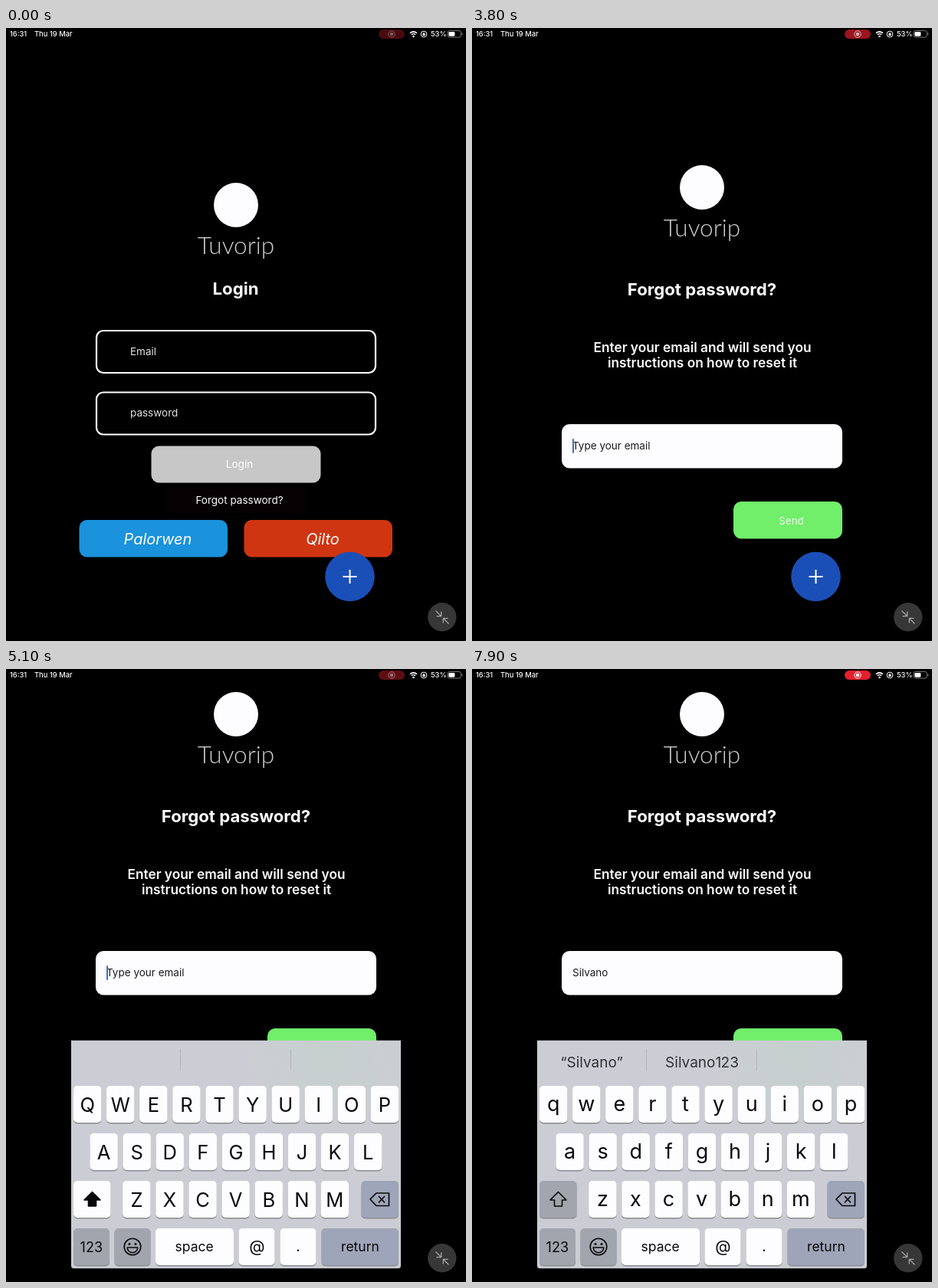
An HTML page with a canvas that plays this animation: 600 px wide and 800 px high, repeating every 8000 ms.

```html
<!DOCTYPE html>
<html lang="en">
<head>
<meta charset="utf-8">
<title>Password reset</title>
<style>
html, body { margin: 0; width: 100%; height: 100%; overflow: hidden; background: #000; }
canvas { display: block; width: 600px; height: 800px; }
</style>
</head>
<body>
<canvas id="stage"></canvas>
<script>
const LOOP = 8000, STEP = 100;
const WHITE = '#fdfcfe', INK = '#08080a';
const NAME = 'Silvano';
const TYPED_AT = [5300, 5600, 6000, 6400, 6500, 6900, 7200];
const FOCUS = 3800;

const canvas = document.getElementById('stage');
const ctx = canvas.getContext('2d');
const dpr = window.devicePixelRatio || 1;
canvas.width = 600 * dpr;
canvas.height = 800 * dpr;

const clamp = v => Math.max(0, Math.min(1, v));

// Critically damped spring from 0 to 1
function spring(ms) {
  const x = Math.max(0, ms) * 0.0163;
  return 1 - (1 + x) * Math.exp(-x);
}

function box(x, y, w, h, r, fill) {
  ctx.beginPath();
  ctx.roundRect(x, y, w, h, r);
  if (fill) {
    ctx.fillStyle = fill;
    ctx.fill();
  }
}

function disc(x, y, r, fill) {
  ctx.beginPath();
  ctx.arc(x, y, r, 0, 7);
  ctx.fillStyle = fill;
  ctx.fill();
}

function ring(x, y, r, color, width) {
  ctx.beginPath();
  ctx.arc(x, y, r, 0, 7);
  ctx.strokeStyle = color;
  ctx.lineWidth = width;
  ctx.stroke();
}

// Each path is a flat list of coordinates
function lines(paths, color, width) {
  ctx.beginPath();
  for (const p of paths) {
    ctx.moveTo(p[0], p[1]);
    for (let i = 2; i < p.length; i += 2) ctx.lineTo(p[i], p[i + 1]);
  }
  ctx.strokeStyle = color;
  ctx.lineWidth = width;
  ctx.stroke();
}

function label(str, x, y, font, color = WHITE, align = 'center') {
  ctx.font = font + ' Inter, "Liberation Sans", sans-serif';
  ctx.textAlign = align;
  ctx.fillStyle = color;
  ctx.fillText(str, x, y);
}

function statusBar(t) {
  label('16:31', 5, 11, '500 9.3px', WHITE, 'left');
  label('Thu 19 Mar', 37, 11, '500 9.4px', WHITE, 'left');
  label('53%', 554, 11, '500 9.3px', WHITE, 'left');

  ctx.save();
  ctx.globalAlpha = 0.32 + 0.68 * Math.min(1, 1 - Math.cos(t / 1750 * 2 * Math.PI));
  box(486, 2, 34, 12, 6, '#e4202f');
  ring(503, 8, 4.2, '#fff', 1);
  disc(503, 8, 2.3, '#fff');
  ctx.restore();

  ctx.strokeStyle = WHITE;
  ctx.lineWidth = 1.6;
  for (const r of [3.6, 6.4]) {
    ctx.beginPath();
    ctx.arc(531.5, 11.3, r, -Math.PI * 0.75, -Math.PI * 0.25);
    ctx.stroke();
  }
  disc(531.5, 11, 1.3, WHITE);

  ring(545, 8, 3.9, WHITE, 1);
  box(543.4, 7.3, 3.2, 2.6, 0.5, WHITE);
  ring(545, 7.2, 1, WHITE, 0.7);

  box(576, 3.5, 17.5, 8.6, 2.6);
  ctx.strokeStyle = '#77777a';
  ctx.lineWidth = 1;
  ctx.stroke();
  box(577.4, 4.9, 8, 5.8, 1.4, WHITE);
  box(594.4, 6.4, 1.2, 2.8, 0.6, '#77777a');
}

function brand(y) {
  disc(300, y, 29, WHITE);
  ctx.font = '300 31.5px Lato, sans-serif';
  ctx.textAlign = 'center';
  ctx.fillStyle = '#d0d0d2';
  ctx.fillText('Tuvorip', 300, y + 64);
}

function outlined(y, str) {
  box(118, y, 364, 55, 9);
  ctx.strokeStyle = '#fff';
  ctx.lineWidth = 2.2;
  ctx.stroke();
  label(str, 162, y + 31.5, '13.5px', '#e2e2e4', 'left');
}

function loginPage() {
  brand(231);
  label('Login', 299.5, 348, '700 22.2px');
  outlined(395, 'Email');
  outlined(475.5, 'password');
  box(189.5, 545.5, 221, 48, 10, '#c7c7c7');
  label('Login', 304.5, 574, '13.5px');
  box(210, 599, 180, 34, 8, '#060203');
  label('Forgot password?', 304.5, 620.5, '13.5px');
  box(95.5, 642, 193.5, 48.5, 10, '#1a92dc');
  label('Palorwen', 198, 673.5, 'italic 400 20px');
  box(310.5, 642, 193.5, 48.5, 10, '#d03511');
  label('Qilto', 413, 673.5, 'italic 400 20px');
}

function caretOn(t, typed) {
  if (t < FOCUS) return false;
  const since = typed ? TYPED_AT[typed - 1] : FOCUS;
  return (t - since) % 1000 < 600;
}

function resetPage(t, typed) {
  ctx.save();
  ctx.translate(0, -149 * spring(t - FOCUS - 23));
  brand(208);
  label('Forgot password?', 300, 349, '700 22.2px');
  label('Enter your email and will send you', 300.5, 422.5, '600 17.3px');
  label('instructions on how to reset it', 300.5, 443, '600 17.3px');
  box(117, 517, 366, 57.5, 10, WHITE);
  const str = NAME.slice(0, typed);
  label(str || 'Type your email', 131, 550, '13.5px', '#1a1a1c', 'left');
  if (caretOn(t, typed)) {
    const x = 131 + (typed ? ctx.measureText(str).width : 0);
    box(x, 536, 2, 19, 1, '#416fd0');
  }
  box(341, 618, 142, 48.5, 10, '#71ee6a');
  label('Send', 416.5, 647.5, '13.5px', '#eefcee');
  ctx.restore();
}

function addButton() {
  disc(448.5, 716, 32.3, '#1b4fb8');
  lines([[439.5, 716, 457.5, 716], [448.5, 707, 448.5, 725]], '#fff', 2);
}

function key(x, y, w, fill = WHITE) {
  box(x, y + 1.3, w, 48.2, 5, '#8b8d93');
  box(x, y, w, 48, 5, fill);
}

function shiftIcon(upper) {
  const pts = [112.5, 682.5, 123, 693, 117.5, 693, 117.5, 701, 107.5, 701, 107.5, 693, 102, 693];
  ctx.beginPath();
  for (let i = 0; i < pts.length; i += 2) ctx.lineTo(pts[i], pts[i + 1]);
  ctx.closePath();
  ctx.fillStyle = ctx.strokeStyle = INK;
  ctx.lineWidth = 1.6;
  if (upper) ctx.fill();
  ctx.stroke();
}

function deleteIcon() {
  ctx.beginPath();
  for (const [x, y] of [[475, 692], [483, 684], [499.5, 684], [499.5, 700.5], [483, 700.5]]) ctx.lineTo(x, y);
  ctx.closePath();
  ctx.strokeStyle = INK;
  ctx.lineWidth = 1.7;
  ctx.stroke();
  lines([[486, 688, 494, 696.4], [494, 688, 486, 696.4]], INK, 1.6);
}

function smiley() {
  ring(165, 754, 10.8, INK, 1.6);
  disc(161, 750.5, 1.5, INK);
  disc(169, 750.5, 1.5, INK);
  ctx.beginPath();
  ctx.arc(165, 755, 6.8, 0, Math.PI);
  ctx.closePath();
  ctx.lineWidth = 1.5;
  ctx.stroke();
}

// Letters appear one after another from the left
function fadeIn(str, cx, y, age) {
  ctx.font = '19px Inter, "Liberation Sans", sans-serif';
  const left = cx - ctx.measureText(str).width / 2;
  [...str].forEach((ch, i) => {
    ctx.globalAlpha = clamp((age - 30 * i) / 300);
    label(ch, left + ctx.measureText(str.slice(0, i)).width, y, '19px', '#303236', 'left');
  });
  ctx.globalAlpha = 1;
}

function suggestions(t, typed) {
  const y = 520;
  const fixing = typed === 2;
  if (fixing) {
    box(228, 491, 144, 44, 5, '#e9e9ee');
    label('To', 300, y, '19px', '#202124');
  } else {
    lines([[227.5, 496, 227.5, 524], [371.5, 496, 371.5, 524]], '#b2b4ba', 1);
  }
  if (typed) label('\u201c' + NAME.slice(0, typed) + '\u201d', 156, y, '19px', '#303236');
  const age = t - TYPED_AT[4];
  if (age >= 0) {
    fadeIn(NAME + '123', 300, y, age);
    if (typed < NAME.length) fadeIn(NAME, 443, y, age);
  }
}

function keyboard(t, typed) {
  const drop = 298 * (1 - spring(t - FOCUS - 8));
  if (drop > 297) return;
  const upper = !typed;
  ctx.save();
  box(85, 484.5, 430, 298, [0, 0, 4, 4]);
  ctx.clip();
  ctx.translate(0, drop);
  box(85, 484.5, 430, 298, 0, '#cccdd4');

  // Button colour showing through the blurred panel
  const glow = ctx.createRadialGradient(420, 492, 5, 420, 492, 110);
  glow.addColorStop(0, 'rgba(185,214,194,0.35)');
  glow.addColorStop(1, 'rgba(185,214,194,0)');
  ctx.fillStyle = glow;
  ctx.fillRect(85, 484.5, 430, 130);

  suggestions(t, typed);

  ['qwertyuiop', 'asdfghjkl', 'zxcvbnm'].forEach((row, r) => {
    const first = [106.2, 127.6, 170.4][r];
    [...row].forEach((ch, i) => {
      const x = first + i * 43.08;
      key(x - 18.2, 544 + r * 62, 36.4);
      const base = r * 62;
      if (upper) label(ch.toUpperCase(), x, 578 + base, '400 25.5px', INK);
      else label(ch, x, 576.5 + base, '400 27px', INK);
    });
  });

  const grey = '#a2a5ae', blue = '#9ea5b8';
  key(88, 668, 48.5, upper ? WHITE : grey);
  shiftIcon(upper);
  key(463.5, 668, 48.5, blue);
  deleteIcon();
  key(88, 730, 47, grey);
  key(141.5, 730, 47, grey);
  key(195, 730, 102, WHITE);
  key(303.5, 730, 47, WHITE);
  key(357.5, 730, 47, WHITE);
  key(411.5, 730, 100.5, blue);
  label('123', 111.3, 761, '18px', INK);
  smiley();
  label('space', 245.7, 760, '17.5px', INK);
  label('@', 327.3, 761, '21px', INK);
  label('.', 381, 760, '19px', INK);
  label('return', 462, 760, '17.5px', INK);
  ctx.restore();
}

function shrinkButton() {
  disc(568.8, 768.8, 18.7, '#373738');
  lines([
    [560.5, 760.5, 567.5, 767.5], [567.7, 761.5, 567.7, 767.7, 561.5, 767.7],
    [577.5, 777.5, 570.5, 770.5], [570.3, 776.5, 570.3, 770.3, 576.5, 770.3]
  ], '#a5a5a7', 1.3);
}

function draw(t) {
  const typed = TYPED_AT.filter(at => t >= at).length;
  ctx.setTransform(dpr, 0, 0, dpr, 0, 0);
  ctx.fillStyle = '#000';
  ctx.fillRect(0, 0, 600, 800);
  ctx.lineJoin = 'round';

  const turn = clamp((t - 2000) / 200);
  if (turn < 1) {
    ctx.globalAlpha = 1 - turn;
    loginPage();
  }
  if (turn > 0) {
    ctx.globalAlpha = turn;
    resetPage(t, typed);
  }
  ctx.globalAlpha = 1;
  addButton();
  keyboard(t, typed);
  shrinkButton();
  statusBar(t);
}

let start;
function tick(now) {
  if (start === undefined) start = now;
  const t = (now - start) % LOOP;
  draw(Math.floor(t / STEP) * STEP);
  requestAnimationFrame(tick);
}
draw(0);
requestAnimationFrame(tick);
</script>
</body>
</html>
```
